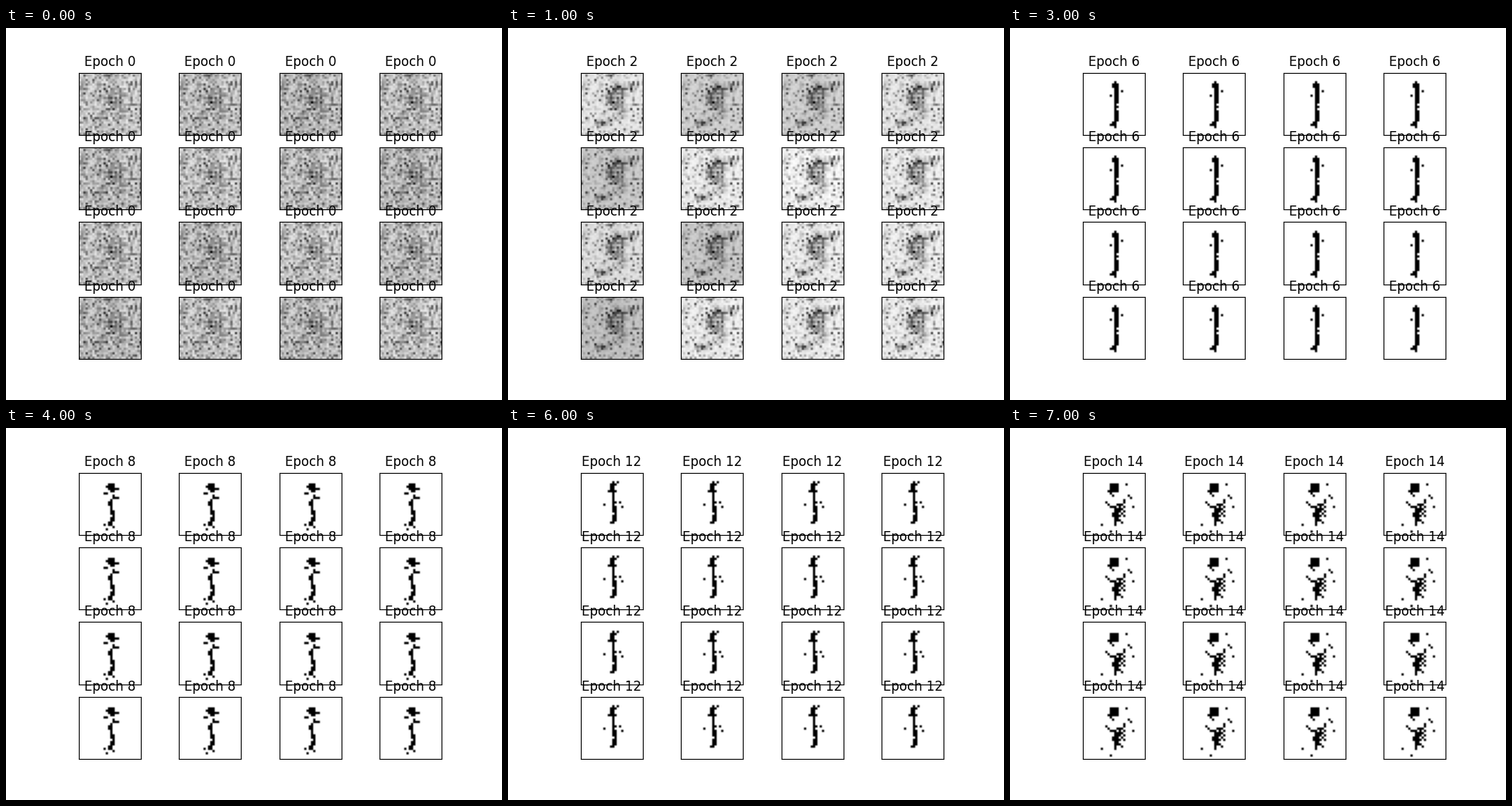
Write a matplotlib script that moves like this. It is 640 by 480 pixels and loops after 8000 ms.

```python
import numpy as np
import matplotlib.pyplot as plt
from matplotlib.animation import FuncAnimation

N = 28
STEP = 2
Y, X = np.mgrid[0:N, 0:N].astype(float)

rng = np.random.default_rng(12)
grain, fleck, sieve = rng.random((3, N, N))


def distance(points):
    """Distance of every cell to a polyline."""
    best = np.full((N, N), np.inf)
    for (xa, ya), (xb, yb) in zip(points, points[1:]):
        dx, dy = xb - xa, yb - ya
        t = np.clip(((X - xa) * dx + (Y - ya) * dy) / (dx * dx + dy * dy), 0, 1)
        best = np.minimum(best, np.hypot(X - xa - t * dx, Y - ya - t * dy))
    return best


def glow(width, *points):
    return np.exp(-(distance(points) / width) ** 2)


def solid(width, *points):
    """Black line whose edge is roughened by the shared noise."""
    return (distance(points) <= width * (0.7 + 0.6 * sieve)).astype(float)


def dots(*cells):
    img = np.zeros((N, N))
    for x, y in cells:
        img[y, x] = 1
    return img


def specks(density, sharp=6):
    return np.clip((density - sieve) * sharp, 0, 1)


def merge(*layers):
    return np.maximum.reduce(layers)


# Untrained noise with a faint smudge
smudge = merge(0.3 * glow(4, (16, 11), (17, 17)),
               0.45 * glow(0.8, (10, 11), (14, 15)),
               0.5 * glow(0.6, (5, 20), (12, 20.5)))


def noise(panel):
    tone = 0.08 + 0.012 * (panel * 7 % 5)
    return np.clip(tone + 0.18 * grain + 0.55 * fleck ** 4 + smudge * grain, 0, 1)


# Rough curl coming out of the noise
curl = merge(glow(1.5, (22, 6.5), (16, 6), (12, 10), (12, 13), (15, 15)),
             0.75 * glow(2.5, (17, 8), (16, 12), (17, 17)),
             glow(1, (14, 20), (11, 22), (7, 22)))
HAZE = "2552610136117111"


def rough(panel):
    haze = int(HAZE[panel]) / 34
    img = 0.08 * grain + 0.7 * fleck ** 7 + curl * (0.15 + 0.65 * grain ** 1.4)
    return np.clip(haze + img * (1 - haze), 0, 1)


# Competing candidates, one kind per panel
foot = merge(solid(0.7, (15, 16), (13, 20)), solid(0.7, (15, 17), (17, 20)))
arc = glow(2, (7, 16), (9, 10), (15, 5), (22, 8))
left = glow(2, (10, 7), (11, 10), (8, 13), (10, 16))
right = glow(2, (20, 5), (18, 8), (16, 13), (17, 18))
pair = 0.75 * left + 0.9 * right
stem = solid(0.8, (13.5, 8), (14, 13), (14.5, 17), (13.5, 21))
spray = specks(0.22 * arc)

KINDS = {
    "A": merge(foot, spray),
    "B": merge(foot, specks(0.4 * arc + 0.4 * right)),
    "C": merge(foot, specks(0.75 * pair)),
    "D": merge(spray, specks(1.3 * glow(1.8, (18, 5), (15, 13), (12, 22)))),
    "F": merge(stem, spray),
    "I": merge(stem, spray * (X > 13)),
    "M": specks(0.75 * pair + 0.35 * arc, 2.5),
    "T": specks(pair),
}
MIX = "AAFBAMFAITDTCTFA"


def mixed(panel):
    return KINDS[MIX[panel]]


# Settled figures
bar = merge(solid(1.2, (14, 5), (14.5, 8)),
            solid(1, (14.5, 8), (14, 16), (15, 19), (13.5, 23)),
            dots((17, 8), (12, 10), (12, 23)))

post = merge(solid(1.6, (14, 6), (14, 6.5)),
             solid(0.5, (14.5, 8), (14.5, 11)),
             solid(0.4, (16, 7), (17, 7)),
             solid(0.4, (11, 9), (12, 9)),
             solid(0.4, (15, 11), (17, 11)),
             solid(0.9, (13.5, 13), (14, 16), (15, 19), (13.5, 23)),
             dots((11, 23), (12, 25), (15, 24)))

twig = merge(solid(0.4, (13, 6), (15, 4)),
             solid(0.8, (14, 7), (13, 11)),
             solid(0.4, (13, 11), (13, 14)),
             solid(0.5, (14, 15), (17, 13.5)),
             solid(0.6, (15, 17), (15, 19), (14, 23)),
             dots((13, 2), (11, 14), (18, 15)))
bulge = solid(1.3, (15, 17), (15, 20))
GROWTH = "2021020022210222"


def branch(panel):
    level = int(GROWTH[panel])
    return merge(twig, bulge * (Y < 16 + 3 * level))


knot = merge(solid(1.4, (14, 5), (13.5, 8)),
             solid(0.5, (14, 9), (13.5, 13)),
             solid(1, (14, 13), (15, 18), (14, 22)),
             dots((16, 4), (10, 14), (17, 13), (18, 15)))

checker = (X + Y) % 2 * (abs(X - 17) < 2) * (abs(Y - 18) < 5) * (sieve < 0.75)
head = merge(solid(2, (14, 6), (13.5, 7)),
             solid(0.5, (11, 8), (13, 10)),
             solid(0.5, (10, 13), (12, 15), (16, 14)),
             solid(0.4, (18, 12), (18, 13)),
             solid(1.8, (14.5, 17), (14.5, 20)),
             solid(0.5, (14, 21), (14, 23)),
             checker,
             dots((19, 5), (20, 10), (21, 11), (22, 15), (8, 23), (12, 26)))

STAGES = [noise, rough, mixed, lambda p: bar, lambda p: post, branch,
          lambda p: knot, lambda p: head]

fig, axes = plt.subplots(4, 4, figsize=(6.4, 4.8), dpi=100)
images = []
for ax in axes.flat:
    ax.set_xticks([])
    ax.set_yticks([])
    images.append(ax.imshow(np.zeros((N, N)), cmap="gray_r", vmin=0, vmax=1))


def update(i):
    for panel, (ax, image) in enumerate(zip(axes.flat, images)):
        image.set_data(STAGES[i](panel))
        ax.set_title(f"Epoch {STEP * i}")
    return images


anim = FuncAnimation(fig, update, frames=len(STAGES), interval=1000,
                     repeat=True, repeat_delay=0)
plt.show()
```
